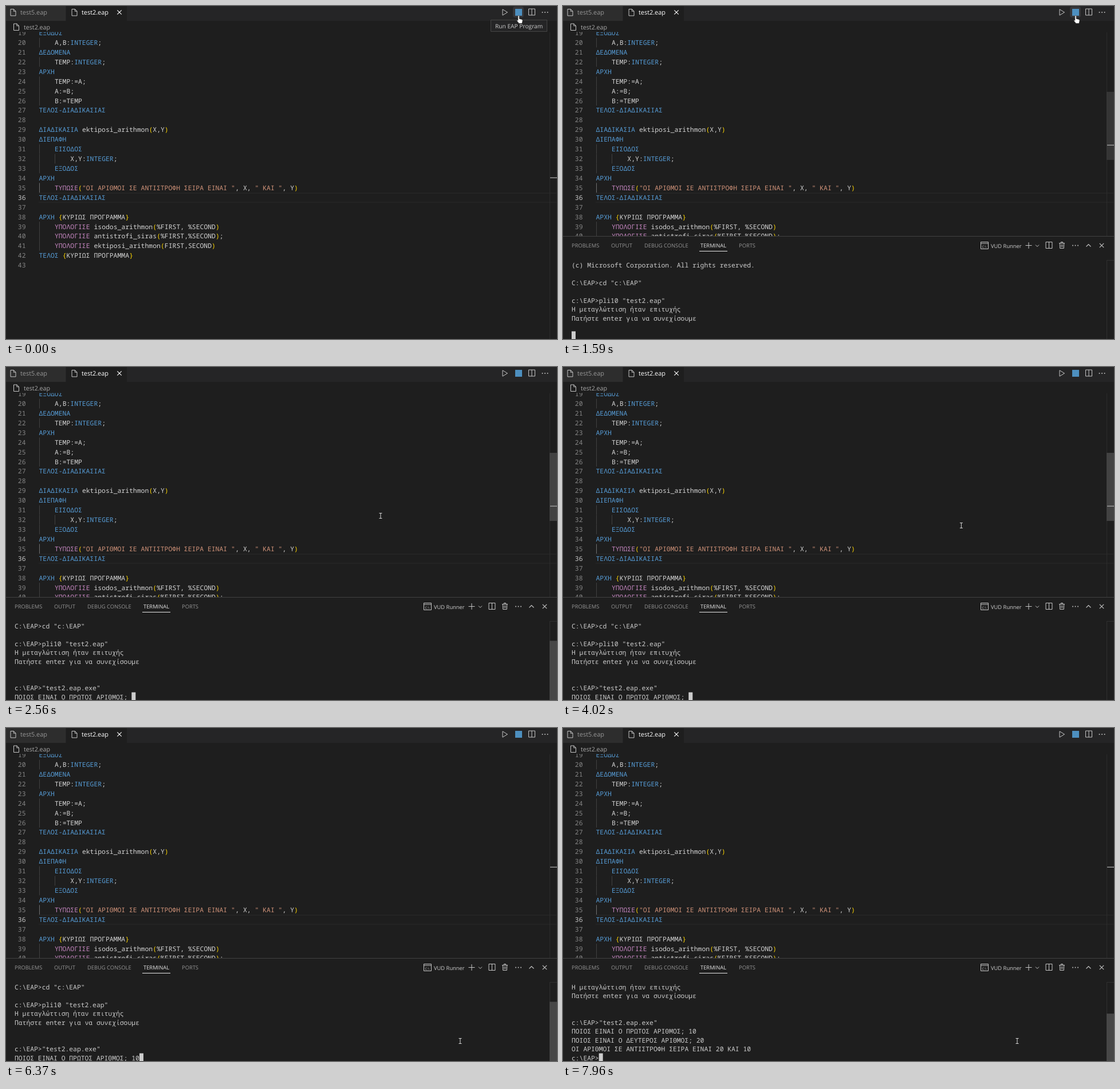
These frames come from a looping animation (962 by 582 pixels, 8000 ms). An HTML page with a canvas:

```html
<!DOCTYPE html>
<html lang="el">
<head>
<meta charset="utf-8">
<title>Editor with terminal</title>
<style>
  html, body { margin: 0; width: 100%; height: 100%; overflow: hidden; background: #1e1e1e; }
  canvas { display: block; }
</style>
</head>
<body>
<canvas id="stage" width="962" height="582"></canvas>
<script>
const ctx = document.getElementById('stage').getContext('2d');
ctx.textRendering = 'geometricPrecision';

const LOOP = 8000, TICK = 90;
const MONO = '"Noto Sans Mono", monospace', SANS = '"Open Sans", sans-serif';
const ROW = 16.92, CHAR = 6.855, CODE_X = 57.5, FIRST_LINE = 19, ACTIVE_LINE = 36;
const TERM_ROW = 15.57, TERM_CHAR = 6.81, TERM_ROWS = 9, TERM_TOP = 444.5, PANEL_TOP = 402;

const code = `ΕΞΟΔΟΣ
    A,B:INTEGER;
ΔΕΔΟΜΕΝΑ
    TEMP:INTEGER;
ΑΡΧΗ
    TEMP:=A;
    A:=B;
    B:=TEMP
ΤΕΛΟΣ-ΔΙΑΔΙΚΑΣΙΑΣ

ΔΙΑΔΙΚΑΣΙΑ ektiposi_arithmon(X,Y)
ΔΙΕΠΑΦΗ
    ΕΙΣΟΔΟΣ
        X,Y:INTEGER;
    ΕΞΟΔΟΣ
ΑΡΧΗ
    ΤΥΠΩΣΕ("ΟΙ ΑΡΙΘΜΟΙ ΣΕ ΑΝΤΙΣΤΡΟΦΗ ΣΕΙΡΑ ΕΙΝΑΙ ", X, " ΚΑΙ ", Y)
ΤΕΛΟΣ-ΔΙΑΔΙΚΑΣΙΑΣ

ΑΡΧΗ {ΚΥΡΙΩΣ ΠΡΟΓΡΑΜΜΑ}
    ΥΠΟΛΟΓΙΣΕ isodos_arithmon(%FIRST, %SECOND)
    ΥΠΟΛΟΓΙΣΕ antistrofi_siras(%FIRST,%SECOND);
    ΥΠΟΛΟΓΙΣΕ ektiposi_arithmon(FIRST,SECOND)
ΤΕΛΟΣ {ΚΥΡΙΩΣ ΠΡΟΓΡΑΜΜΑ}
`.split('\n');

// Terminal output: [time, appended text]
const output = [
  [790, 'Microsoft Windows [Version 10.0.19045.2364]\n(c) Microsoft Corporation. All rights reserved.\n\n' +
        'C:\\EAP>cd "c:\\EAP"\n\nc:\\EAP>pli10 "test2.eap"\n'],
  [1140, 'Η μεταγλώττιση ήταν επιτυχής\nΠατήστε enter για να συνεχίσουμε\n'],
  [1500, '\n'],
  [2040, '\nc:\\EAP>"test2.eap.exe"\n'],
  [2290, 'ΠΟΙΟΣ ΕΙΝΑΙ Ο ΠΡΩΤΟΣ ΑΡΙΘΜΟΣ; '],
  [6090, '1'], [6370, '0'],
  [6750, '\nΠΟΙΟΣ ΕΙΝΑΙ Ο ΔΕΥΤΕΡΟΣ ΑΡΙΘΜΟΣ; '],
  [7500, '2'], [7690, '0'], [7870, '\n'],
  [7960, 'ΟΙ ΑΡΙΘΜΟΙ ΣΕ ΑΝΤΙΣΤΡΟΦΗ ΣΕΙΡΑ ΕΙΝΑΙ 20 ΚΑΙ 10\nc:\\EAP>'],
];

const clamp = v => Math.max(0, Math.min(1, v));
const ramp = (t, from, to) => clamp((t - from) / (to - from));
const lerp = (a, b, p) => a + (b - a) * p;

function rect(x, y, w, h, color) {
  ctx.fillStyle = color;
  ctx.fillRect(x, y, w, h);
}

function text(str, x, y, color, size = 10.9, family = SANS) {
  ctx.font = `${size}px ${family}`;
  ctx.fillStyle = color;
  ctx.fillText(str, x, y);
}

// Path with its own origin; stroke and fill are optional
function shape(d, x, y, stroke, fill, width = 1) {
  const path = new Path2D(d);
  ctx.save();
  ctx.translate(x, y);
  ctx.lineWidth = width;
  if (fill) { ctx.fillStyle = fill; ctx.fill(path); }
  if (stroke) { ctx.strokeStyle = stroke; ctx.stroke(path); }
  ctx.restore();
}

function clipped(y, h, draw) {
  ctx.save();
  ctx.beginPath();
  ctx.rect(0, y, 962, h);
  ctx.clip();
  draw();
  ctx.restore();
}

const ICON = '#c5c5c5';
const fileIcon = (x, y) => shape('M-4.5-5.5h5.5l3.5 3.5v8h-9zM.8-5.5v3.7h3.7', x, y, ICON);
const closeIcon = (x, y, color = ICON) => shape('M-3.7-3.7l7.4 7.4M3.7-3.7l-7.4 7.4', x, y, color, null, 1.1);
const splitIcon = (x, y) => shape('M-5.5-5.5h11v11h-11zM0-5.5v11', x, y, ICON);
const moreIcon = (x, y) => [-4.5, 0, 4.5].forEach(dx => rect(x + dx - .8, y - .8, 1.7, 1.7, ICON));

function drawHeader(hover) {
  rect(0, 0, 962, 26, '#252526');
  rect(0, 0, 104, 26, '#2d2d2d');
  rect(105, 0, 106, 26, '#1e1e1e');
  fileIcon(12.5, 11);
  text('test5.eap', 25, 15, '#969696');
  fileIcon(119.5, 11);
  text('test2.eap', 132, 15, '#ffffff');
  closeIcon(198, 11, '#ffffff');
  fileIcon(18, 36.5);
  text('test2.eap', 31, 41, '#a9a9a9', 10.7);

  shape('M-4-5.2l8.5 5.2-8.5 5.2z', 871, 11, ICON);
  if (hover) {
    ctx.beginPath();
    ctx.roundRect(885, 1, 19, 19, 4);
    ctx.fillStyle = '#37373a';
    ctx.fill();
  }
  rect(889, 5, 12, 12, '#4d8fbf');
  splitIcon(918, 10.5);
  moreIcon(941, 11);
}

function tokenColor(token, inBraces) {
  if (token[0] === '"') return '#ce9178';
  if (/^[(){}]$/.test(token)) return '#ffd700';
  if (inBraces) return '#d4d4d4';
  if (/^(ΤΥΠΩΣΕ|ΥΠΟΛΟΓΙΣΕ)$/.test(token)) return '#c586c0';
  return /^([Α-Ω]|INTEGER)/.test(token) ? '#569cd6' : '#d4d4d4';
}

function drawCodeLine(line, i) {
  const number = FIRST_LINE + i, y = 47.1 + i * ROW, active = number === ACTIVE_LINE;
  if (active) {
    rect(57, 326.5, 904, 1, '#2b2b2b');
    rect(57, 342.5, 904, 1, '#2b2b2b');
  }
  const indent = line.search(/\S|$/);
  for (let col = 0; col < indent; col += 4)
    rect(Math.round(CODE_X + col * CHAR), y - ROW / 2, 1, ROW, number === 35 ? '#707070' : '#404040');
  text(number, 34.5 - 2 * CHAR, y + 4, active ? '#c6c6c6' : '#858585', CHAR / .6, MONO);
  for (const m of line.matchAll(/".*?"|(?<=\{)[^}]+|[Α-Ω]+(-[Α-Ω]+)?|INTEGER|\w+|\S/g))
    text(m[0], CODE_X + m.index * CHAR, y + 4, tokenColor(m[0], line[m.index - 1] === '{'), CHAR / .6, MONO);
}

function drawEditor(t, panelOpen) {
  const bottom = panelOpen ? PANEL_TOP : 582;
  clipped(45.5, bottom - 45.5, () => {
    code.forEach(drawCodeLine);
    rect(949, 46, 1, 536, '#2c2c2c');
    if (panelOpen) {
      ctx.globalAlpha = t < 2110 ? 1 - ramp(t, 1500, 1750) : ramp(t, 2200, 2300) - ramp(t, 4380, 4740);
      rect(949, 150, 13, 119, '#424242');
      ctx.globalAlpha = 1;
    }
    rect(950, panelOpen ? 242.5 : 299.5, 12, 1.4, '#a0a0a0');
  });
}

function drawPanelBar(t) {
  rect(0, PANEL_TOP, 962, 1, '#414141');
  const tabs = { PROBLEMS: 15, OUTPUT: 84, 'DEBUG CONSOLE': 142, TERMINAL: 240, PORTS: 307 };
  for (const [name, x] of Object.entries(tabs))
    text(name, x, 422, name === 'TERMINAL' ? '#e7e7e7' : '#969696', 9.35);
  rect(238, 428, 49, 1, '#e7e7e7');

  if (t >= 790) {
    shape('M.5.5h13v12h-13zM.5 3h13', 729, 412, ICON);
    text('C:\\', 731.5, 422.5, ICON, 6);
    text('VUD Runner', 747, 422.5, '#cccccc', 9.35);
  }
  shape('M-5.5 0h11M0-5.5v11', 813, 418.5, ICON);
  shape('M-3-1.5l3 3 3-3', 828, 419, ICON);
  splitIcon(848.5, 418);
  shape('M-5-3.5h10M-1.5-3.5v-2h3v2M-3.8-3.5l.5 9h6.6l.5-9M-1.2-1.5v5M1.2-1.5v5', 871, 418, ICON);
  moreIcon(894.5, 418.5);
  shape('M-4 2l4-4 4 4', 917.5, 418.5, ICON, null, 1.1);
  closeIcon(940.5, 418.5);
}

function drawTerminal(t) {
  rect(949, 444, 13, 1, '#303030');
  rect(949, 444, 1, 138, '#303030');
  if (t < 710) return;

  const lines = output.filter(([at]) => at <= t).map(([, str]) => str).join('').split('\n');
  const scroll = Math.max(0, lines.length - TERM_ROWS);
  const visible = lines.slice(scroll);
  visible.forEach((line, i) =>
    text(line, 15, TERM_TOP + i * TERM_ROW + 12, '#cccccc', TERM_CHAR / .6, MONO));
  const last = visible.length - 1;
  rect(15 + visible[last].length * TERM_CHAR, TERM_TOP + last * TERM_ROW - .5, 7, TERM_ROW, '#cccccc');

  const thumbShown = t >= 2040 && t < 3010 || t >= 4470 && t < 5100 || t >= 5550;
  if (thumbShown) {
    const height = 138 * TERM_ROWS / lines.length;
    rect(949, 582 - height, 13, height, '#474747');
  }
}

function pointerAt(t) {
  if (t < 2040) return [895, 17];
  if (t < 2110) return [890, 28];
  if (t < 4020) {
    const p = Math.min(1, Math.floor((t - 2110) / TICK) / 5);
    return [lerp(883, 654, p), lerp(40, 260, p)];
  }
  if (t < 5550) {
    const p = Math.min(1, (Math.floor((t - 4020) / TICK) + 1) / 8);
    return [lerp(654, 797, 1 - (1 - p) ** 2.56), lerp(260, 540, p ** 1.35)];
  }
  return t < 5640 ? [795, 543] : [793, 547];
}

function drawPointer(t) {
  const [x, y] = pointerAt(t);
  if (t < 2040)
    shape('M-1.2.3q1.2-1.6 2.4 0v5l4.2 1q2 .6 1.7 2.5l-1.2 4.7h-5.2l-3.8-4.6q-.2-1.7 1.9-.8z', x, y, '#222222', '#ffffff', .7);
  else if (y < 46)
    shape('M0 0v9.6l2.2-2 1.6 3.3 1.6-.8-1.5-3.1h2.9z', x, y, '#111111', '#ffffff', .6);
  else
    shape('M-2.5-4.5h5M-2.5 4.5h5M0-4.5v9', x, y, '#d8d8d8');
}

function draw(t) {
  const panelOpen = t >= 620;
  rect(0, 0, 962, 582, '#1e1e1e');
  drawHeader(t < 2040);
  drawEditor(t, panelOpen);
  if (panelOpen) {
    drawPanelBar(t);
    drawTerminal(t);
  }
  if (t < 530) {
    shape('M846.5 24.5h98v20h-98z', 0, 0, '#454545', '#252526');
    text('Run EAP Program', 854, 39, '#cccccc', 10.2);
  }
  drawPointer(t);
}

const start = performance.now();
function frame() {
  draw((performance.now() - start) % LOOP);
  requestAnimationFrame(frame);
}
frame();
</script>
</body>
</html>
```
